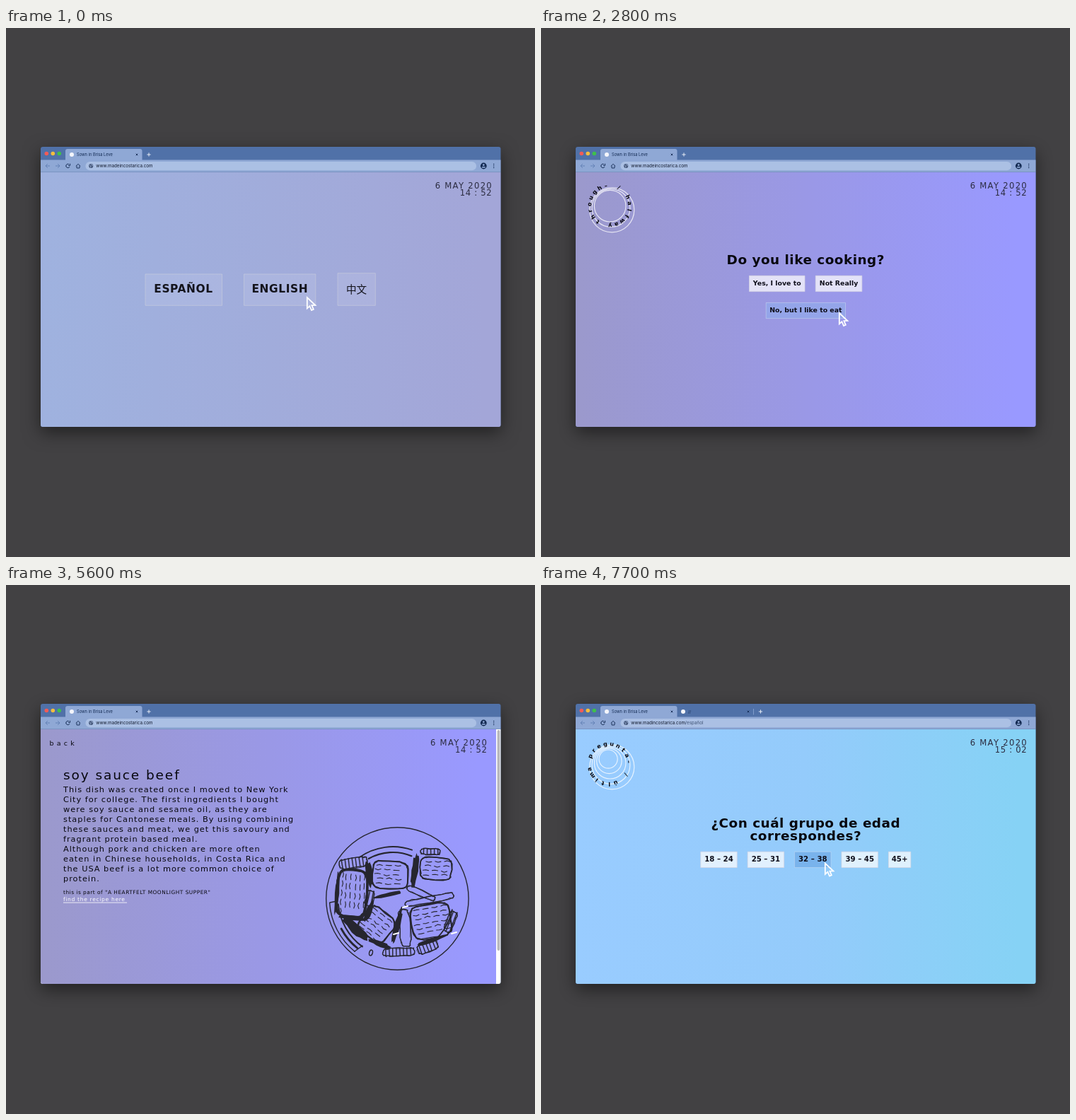
An HTML page with a canvas for the animation above (8 s loop, 748x748 px).

```html
<!DOCTYPE html>
<html lang="en">
<head>
<meta charset="utf-8">
<title>Browser walkthrough</title>
<style>
  html, body { margin: 0; width: 100%; height: 100%; overflow: hidden; background: #424143; }
  canvas { display: block; width: 100vw; height: 100vh; }
</style>
</head>
<body>
<canvas id="stage"></canvas>
<script>
const SIZE = 748, STEP = 700, LOOP = 8000;
const canvas = document.getElementById('stage');
const ctx = canvas.getContext('2d');
const dpr = window.devicePixelRatio || 1;
canvas.width = canvas.height = SIZE * dpr;

const WIDE = '"DejaVu Sans", sans-serif';
const UI = 'Inter, sans-serif';
const CJK = '"Noto Sans CJK SC", "Noto Sans CJK JP", "Noto Sans CJK", sans-serif';
const NAVY = '#132a52';
const VIOLET = ['#9b99cc', '#9a98e6', '#9999ff'];
const SKY = ['#99ccff', '#94cbfb', '#86d2f5'];
const WIN = { x: 49, y: 168, w: 650.5, h: 396, top: 204 };
const BODY = { size: 11.3, gap: 1 };
const HEAD = { size: 18.5, gap: 1.9 };

// ---------- helpers ----------
function text(str, x, y, size, o = {}) {
  ctx.font = `${o.weight || 400} ${size}px ${o.family || WIDE}`;
  ctx.letterSpacing = (o.gap || 0) + 'px';
  ctx.fillStyle = o.color || '#08080f';
  ctx.textAlign = 'left';
  const w = ctx.measureText(str).width - (o.gap || 0);
  const left = x - w * (o.align || 0);
  ctx.fillText(str, left, y);
  ctx.letterSpacing = '0px';
  if (o.under) ctx.fillRect(left, y + 1.4, w, 0.8);
  return w;
}

function box(x, y, w, h, fill, stroke, r = 0) {
  ctx.beginPath();
  ctx.roundRect(x, y, w, h, r);
  if (fill) { ctx.fillStyle = fill; ctx.fill(); }
  if (stroke) { ctx.strokeStyle = stroke; ctx.lineWidth = 0.9; ctx.stroke(); }
}

function dot(x, y, r, fill) {
  ctx.beginPath();
  ctx.arc(x, y, r, 0, 7);
  ctx.fillStyle = fill;
  ctx.fill();
}

function line(points, color, width = 1) {
  ctx.beginPath();
  points.forEach(([x, y]) => ctx.lineTo(x, y));
  ctx.strokeStyle = color;
  ctx.lineWidth = width;
  ctx.stroke();
}

function cross(x, y, r, color, turn = 0) {
  for (const k of [0, 1]) {
    const a = turn + k * Math.PI / 2, dx = Math.cos(a) * r, dy = Math.sin(a) * r;
    line([[x - dx, y - dy], [x + dx, y + dy]], color, 0.9);
  }
}

function cursor(x, y) {
  ctx.save();
  ctx.translate(x + 0.8, y + 1);
  ctx.beginPath();
  [[0, 0], [0, 15.5], [3.6, 12.2], [6.2, 18], [9, 16.8], [6.6, 11.2], [11.6, 11]]
    .forEach(([px, py]) => ctx.lineTo(px, py));
  ctx.closePath();
  ctx.lineJoin = 'miter';
  ctx.strokeStyle = '#fff';
  ctx.lineWidth = 1.8;
  ctx.stroke();
  ctx.restore();
}

// ---------- browser window ----------
function tab(x, label) {
  dot(x, 179, 3, '#f4f6fb');
  text(label, x + 7, 181, 5.7, { family: UI, color: NAVY });
  cross(x + 92, 179, 1.8, NAVY, Math.PI / 4);
}

function chrome(spanish) {
  ctx.save();
  ctx.shadowColor = 'rgba(0,0,0,.5)';
  ctx.shadowBlur = 24 * dpr;
  ctx.shadowOffsetY = 8 * dpr;
  box(WIN.x, WIN.y, WIN.w, WIN.h, '#5071a8', null, 3);
  ctx.restore();

  ['#f25c57', '#f4bd3e', '#3fbf4b'].forEach((c, i) => dot(57.3 + i * 9, 177.5, 2.8, c));
  box(84, 171, 108.5, 18, '#8fa8d5', null, [3, 3, 0, 0]);
  ctx.fillStyle = '#8fa8d5';
  ctx.fillRect(WIN.x, 186.5, WIN.w, WIN.top - 186.5);
  tab(93, 'Sown in Brisa Leve');
  if (spanish) {
    tab(201, '//');
    line([[300.5, 175], [300.5, 183.5]], '#8fa8d5', 0.8);
  }
  cross(spanish ? 310.5 : 202, 179, 2.6, '#f2f5fb');

  const faint = '#5f7db3';
  line([[62, 195], [56, 195]], faint, 0.9);
  line([[58.8, 192.2], [56, 195], [58.8, 197.8]], faint, 0.9);
  line([[70, 195], [76, 195]], faint, 0.9);
  line([[73.2, 192.2], [76, 195], [73.2, 197.8]], faint, 0.9);
  ctx.beginPath();
  ctx.arc(87.5, 195, 2.7, 0.4, 5.4);
  ctx.strokeStyle = NAVY;
  ctx.lineWidth = 1;
  ctx.stroke();
  line([[90.6, 191.8], [90.6, 194.4], [88, 194.4]], NAVY, 0.9);
  line([[99, 195.3], [102, 192.2], [105, 195.3]], NAVY, 0.9);
  line([[100, 194.8], [100, 198], [104, 198], [104, 194.8]], NAVY, 0.9);

  box(112.5, 189, 552.5, 12.3, '#abc0e4', null, 6.1);
  dot(120.2, 195, 3.1, '#47597c');
  line([[118.2, 194], [120, 195.5], [119.6, 197.4]], '#abc0e4', 0.8);
  line([[120.6, 192.5], [121.4, 194], [123, 194.2]], '#abc0e4', 0.8);
  const url = spanish ? 'www.madincostarica.com' : 'www.madeincostarica.com';
  const w = text(url, 127.3, 197.3, 6.25, { family: UI, color: '#10182c' });
  if (spanish) text('/español', 127.3 + w, 197.3, 6.25, { family: UI, color: '#3f5274' });

  dot(675.3, 195, 4.4, NAVY);
  dot(675.3, 193.7, 1.4, '#8fa8d5');
  box(672.8, 196, 5, 1.7, '#8fa8d5', null, 0.8);
  [-2.5, 0, 2.5].forEach(d => dot(689.7, 195 + d, 0.7, NAVY));
}

function page(stops, time, thumb = 0) {
  const width = thumb ? 644 : WIN.w, tall = WIN.y + WIN.h - WIN.top;
  const g = ctx.createLinearGradient(WIN.x, 0, WIN.x + width, 0);
  stops.forEach((c, i) => g.addColorStop(Math.min(i / (stops.length - 1), 0.96), c));
  box(WIN.x, WIN.top, WIN.w, tall, thumb ? '#fff' : g, null, [0, 0, 3, 3]);
  if (thumb) {
    box(WIN.x, WIN.top, width, tall, g, null, [0, 0, 0, 3]);
    box(694.6, 205, 3.8, thumb, '#b7b7bb', null, 1.9);
  }
  line([[WIN.x, 203.6], [WIN.x + WIN.w, 203.6]], 'rgba(75,100,150,.45)', 0.7);
  const o = { gap: 1.3, align: 1, color: '#2c2d42' };
  const edge = thumb ? 680 : 686.7;
  text('6 MAY 2020', edge, 226.5, 11.6, o);
  text(time, edge, 237.3, 11.6, { ...o, gap: 0.7 });
}

// ---------- screens ----------
function languages(stops, time, hover, tip) {
  page(stops, time);
  const edge = 'rgba(205,208,220,.6)';
  const fill = on => on ? 'rgba(255,255,255,.6)' : 'rgba(255,255,255,.1)';
  box(197, 348, 108.5, 44.3, fill(hover), edge);
  box(336.5, 348, 101.3, 44.3, fill(false), edge);
  box(469, 346.7, 53.3, 45.6, fill(false), edge);
  const o = { weight: 700, align: 0.5, color: '#14141c' };
  text('ESPAÑOL', 250.7, 374.2, 15.4, { ...o, gap: 0.6 });
  text('ENGLISH', 387, 374.2, 15.4, { ...o, gap: 0.6 });
  text('中文', 495.6, 374.6, 14.6, { ...o, weight: 500, family: CJK });
  cursor(...tip);
}

function welcome(stops, time, title, lines, link, tip) {
  page(stops, time);
  const o = { color: '#fff', align: 0.5 };
  text(title, 374, 264, 21, { ...o, gap: 4.2 });
  ctx.fillStyle = '#050508';
  ctx.fillRect(314, 279, 115, 115);
  lines.forEach((s, i) => text(s, 374, 417.4 + i * 12.7, BODY.size, { ...o, gap: BODY.gap }));
  text(link, 373, 485.5, 11.3, { ...o, gap: 4.3, under: true });
  cursor(...tip);
}

function dial(label, start, cx, cy, rings) {
  ctx.strokeStyle = 'rgba(255,255,255,.75)';
  ctx.lineWidth = 1.2;
  for (let i = 0; i < rings; i++) {
    ctx.beginPath();
    ctx.arc(100.3 - 1.3 * i, 257.3 - 2.8 * i, 31.5 - 4.6 * i, 0, 7);
    ctx.stroke();
  }
  const chars = [...`/ ${label}– `], n = chars.length;
  chars.forEach((c, i) => {
    const a = start * Math.PI / 180 + i / n * Math.PI * 2;
    ctx.save();
    ctx.translate(cx, cy);
    ctx.rotate(a + Math.PI / 2);
    text(c, 0, 2.6 - 1.5 * n, 8, { weight: 700, align: 0.5 });
    ctx.restore();
  });
}

function question(stops, time, q) {
  page(stops, time);
  dial(...q.dial);
  q.title.forEach((s, i) => text(s, 374, q.y + i * 18, 18.4, { weight: 700, align: 0.5, gap: 0.5 }));
  q.options.forEach(([label, x, y, w], i) => {
    const on = i === q.pick;
    box(x, y, w, 22.3, on ? q.hover : 'rgba(255,255,255,.72)',
      on ? 'rgba(205,220,240,.55)' : 'rgba(215,214,226,.8)');
    const size = /\d/.test(label) ? 10.2 : 9.4;
    text(label, x + w / 2, y + 14, size, { weight: 700, align: 0.5, color: '#0e0e1a' });
  });
  cursor(...q.tip);
}

const ages = y => ['18 – 24', '25 – 31', '32 – 38', '39 – 45', '45+']
  .map((s, i) => [s, 225.8 + 66.4 * i, y, i < 4 ? 51.4 : 31.4]);

// ---------- plate sketch ----------
let seed = 1;
function rnd() {
  seed = (seed * 16807) % 2147483647;
  return seed / 2147483647 - 0.5;
}
const INK = '#26262f';

function placed(x, y, deg, draw) {
  ctx.save();
  ctx.translate(x, y);
  ctx.rotate(deg * Math.PI / 180);
  draw();
  ctx.restore();
}

function roughBox(w, h, width) {
  const k = v => Math.sign(v) * Math.pow(Math.abs(v), 0.45);
  for (let pass = 0; pass < 2; pass++) {
    const p = [];
    for (let i = 0; i < 28; i++) {
      const a = i / 28 * Math.PI * 2;
      p.push([k(Math.cos(a)) * w / 2 + rnd() * 2, k(Math.sin(a)) * h / 2 + rnd() * 2]);
    }
    line([...p, p[0]], INK, width / (1 + pass * 0.6));
  }
}

// a block of meat with dashed grain
function chunk(x, y, w, h, deg, width, upright) {
  placed(x, y, deg, () => {
    roughBox(w, h, width);
    const across = upright ? w : h, along = upright ? h : w;
    for (let u = -across / 2 + 6; u < across / 2 - 3; u += 6.5) {
      for (let v = -along / 2 + 5 + rnd() * 5; v < along / 2 - 9; v += 13) {
        const d = rnd() * 3, m = u + rnd() * 2;
        line([[v, m], [v + 4, m + d], [v + 8, m]].map(([a, b]) => upright ? [b, a] : [a, b]), INK, 1.1);
      }
    }
  });
}

function ridge(x, y, w, h, deg) {
  placed(x, y, deg, () => {
    roughBox(w, h, 1.3);
    for (let u = -w / 2 + 4; u < w / 2 - 1; u += 5) line([[u, -h / 2], [u + rnd(), h / 2]], INK, 1.4);
  });
}

function strip(x, y, w, h, deg) {
  placed(x, y, deg, () => roughBox(w, h, 1.3));
}

// solid ragged shadow between the pieces
function shade(x, y, rx, ry, deg) {
  placed(x, y, deg, () => {
    ctx.beginPath();
    for (let i = 0; i < 18; i++) {
      const a = i / 9 * Math.PI, r = 1 + rnd() * 0.35;
      ctx.lineTo(Math.cos(a) * rx * r, Math.sin(a) * ry * r);
    }
    ctx.fillStyle = INK;
    ctx.fill();
  });
}

function bow(cx, cy, r, from, to, width) {
  ctx.beginPath();
  ctx.arc(cx, cy, r, from, to);
  ctx.strokeStyle = INK;
  ctx.lineWidth = width;
  ctx.stroke();
}

function plate() {
  seed = 77;
  const cx = 553.4, cy = 443.5;
  ctx.save();
  ctx.lineCap = ctx.lineJoin = 'round';
  bow(cx, cy, 100.7, 0, 7, 1.4);

  shade(514, 409, 5, 18, -8);
  shade(578, 404, 5, 24, 8);
  shade(468, 436, 3, 30, 5);
  shade(513, 462, 4, 15, 20);
  shade(494, 486, 7, 22, -48);
  shade(553, 482, 4, 26, 14);
  shade(528, 507, 18, 4, 22);
  shade(540, 438, 20, 3, -12);
  shade(490, 471, 20, 3, 6);
  shade(600, 503, 22, 3, -18);
  chunk(489, 436, 42, 66, 3, 3.6, true);
  chunk(543, 410, 50, 39, 3, 2);
  chunk(608, 401, 44, 32, 3, 1.8);
  chunk(524, 480, 45, 42, 38, 2);
  chunk(601, 475, 56, 48, -10, 2);

  strip(564, 485, 15, 52, -5);
  strip(599, 445, 70, 9, -11);
  strip(587, 436, 42, 8, 24);
  ridge(491, 393, 40, 14, -8);
  ridge(600, 377, 27, 8, 2);
  ridge(555, 519, 44, 11, -3);
  ridge(596, 512, 29, 14, -20);
  ridge(629, 476, 11, 30, 20);
  ridge(514, 443, 11, 22, 12);

  // bent greens along the rim
  bow(547, 452, 82, 4.1, 5.05, 1.8);
  bow(547, 448, 70, 4.2, 5.1, 2.2);
  bow(cx, cy, 96, 2.25, 3.08, 1.4);
  bow(cx, cy, 84, 2.2, 3.05, 2);
  bow(cx, cy, 90, 2.25, 2.65, 2.8);
  bow(cx, cy, 79, 0.2, 0.85, 1.8);
  line([[458, 449], [468, 447]], INK, 1.5);
  line([[493, 518], [504, 510]], INK, 1.5);
  ctx.beginPath();
  ctx.ellipse(516, 520, 2.3, 4, 0.3, 0, 7);
  ctx.stroke();
  for (const [x, y] of [[565, 455], [552, 493], [634, 492]]) {
    line([[x - 4, y + 1], [x + 3, y - 1]], '#fff', 2);
  }
  ctx.restore();
}

const MEAL = 'A HEARTFELT MOONLIGHT SUPPER';
const STORY = [
  'This dish was created once I moved to New York',
  'City for college. The first ingredients I bought',
  'were soy sauce and sesame oil, as they are',
  'staples for Cantonese meals. By using combining',
  'these sauces and meat, we get this savoury and',
  'fragrant protein based meal.',
  'Although pork and chicken are more often',
  'eaten in Chinese households, in Costa Rica and',
  'the USA beef is a lot more common choice of',
  'protein.'
];

function result() {
  page(VIOLET, '14 : 52', 230);
  text('your meal is', 81, 274.5, HEAD.size, HEAD);
  text(MEAL, 81, 293, BODY.size, BODY);
  plate();
  cursor(560, 470);
}

function dish() {
  page(VIOLET, '14 : 52', 312);
  text('back', 61.5, 226.5, 9.5, { gap: 4.2 });
  text('soy sauce beef', 81, 274.5, HEAD.size, HEAD);
  STORY.forEach((s, i) => text(s, 81, 292.8 + 14 * i, BODY.size, BODY));
  text(`this is part of "${MEAL}"`, 81, 437.3, 7.4, { gap: 0.5 });
  text('find the recipe here ', 81, 447.3, 7.6, { gap: 0.65, color: '#fff', under: true });
  plate();
}

// ---------- sequence ----------
const HOVER = '#94a5e9';
const ask = q => question(VIOLET, '14 : 52', { hover: HOVER, ...q });
const scenes = [
  () => languages(['#9fb2df', '#a1acdb', '#a3a6d8'], '14 : 52', false, [425, 380]),
  () => welcome(VIOLET, '14 : 52', 'WELCOME TO', [
    'an online library of anecdotes and recipes that try to',
    'embody what it means to be Latina 【Costa Rican】 &',
    'Chinese【Cantonese】'], "let's start", [416, 482]),
  () => ask({
    dial: ['first question', -20, 96, 251, 1], title: ['How often do you eat Chinese food?'], y: 343,
    options: [['Every day', 253, 377, 69], ['Sometimes', 337, 377, 74], ['Never', 426, 377, 49]],
    pick: 1, tip: [403, 393] }),
  () => ask({
    dial: ['second question', 60, 96, 251, 2], title: ['Have you ever been to Asia?'], y: 343,
    options: [['Yes, I have', 286, 377, 72], ['Not yet', 373, 377, 56]],
    pick: 0, tip: [350, 393] }),
  () => ask({
    dial: ['halfway through', -63, 97, 251, 3], title: ['Do you like cooking?'], y: 334,
    options: [['Yes, I love to', 294.5, 350.3, 78.5], ['Not Really', 388.3, 350.3, 65.5],
      ['No, but I like to eat', 318.2, 388.4, 112.3]],
    pick: 2, tip: [421, 402] }),
  () => ask({
    dial: ['almost there', 100, 96, 251, 4], title: ['Are you a picky eater?'], y: 351,
    options: [['Yes', 302, 367.2, 34], ['Sometimes', 351, 367.2, 72], ['No', 438, 367.2, 30]],
    pick: 1, tip: [415, 383] }),
  () => ask({
    dial: ['last question', 20, 95, 250, 5], title: ['Which age group do you belong in?'], y: 351,
    options: ages(367.2), pick: 1, tip: [336.5, 383] }),
  result,
  dish,
  () => languages(['#a0b7e2', '#a1b2de', '#a0addb'], '15 : 02', true, [293, 383.5]),
  () => welcome(SKY, '15 : 02', 'BIENVENIDOS A', [
    'una biblioteca virtual de anécdotas y recetas que',
    'intentan mostrar lo que es ser Latina 【Tica】 &',
    'China【Cantonesa】'], 'empecemos', [416, 481]),
  () => question(SKY, '15 : 02', {
    dial: ['última pregunta', 32, 96, 253, 5], title: ['¿Con cuál grupo de edad', 'correspondes?'], y: 343,
    options: ages(377.2), pick: 2, hover: '#79b3ec', tip: [401, 392.5] })
];

let shown = -1;
function frame(now) {
  const step = Math.floor((now % LOOP) / STEP);
  if (step !== shown) {
    shown = step;
    ctx.setTransform(dpr, 0, 0, dpr, 0, 0);
    ctx.fillStyle = '#424143';
    ctx.fillRect(0, 0, SIZE, SIZE);
    chrome(step >= 9);
    scenes[step]();
  }
  requestAnimationFrame(frame);
}
frame(0);
</script>
</body>
</html>
```
